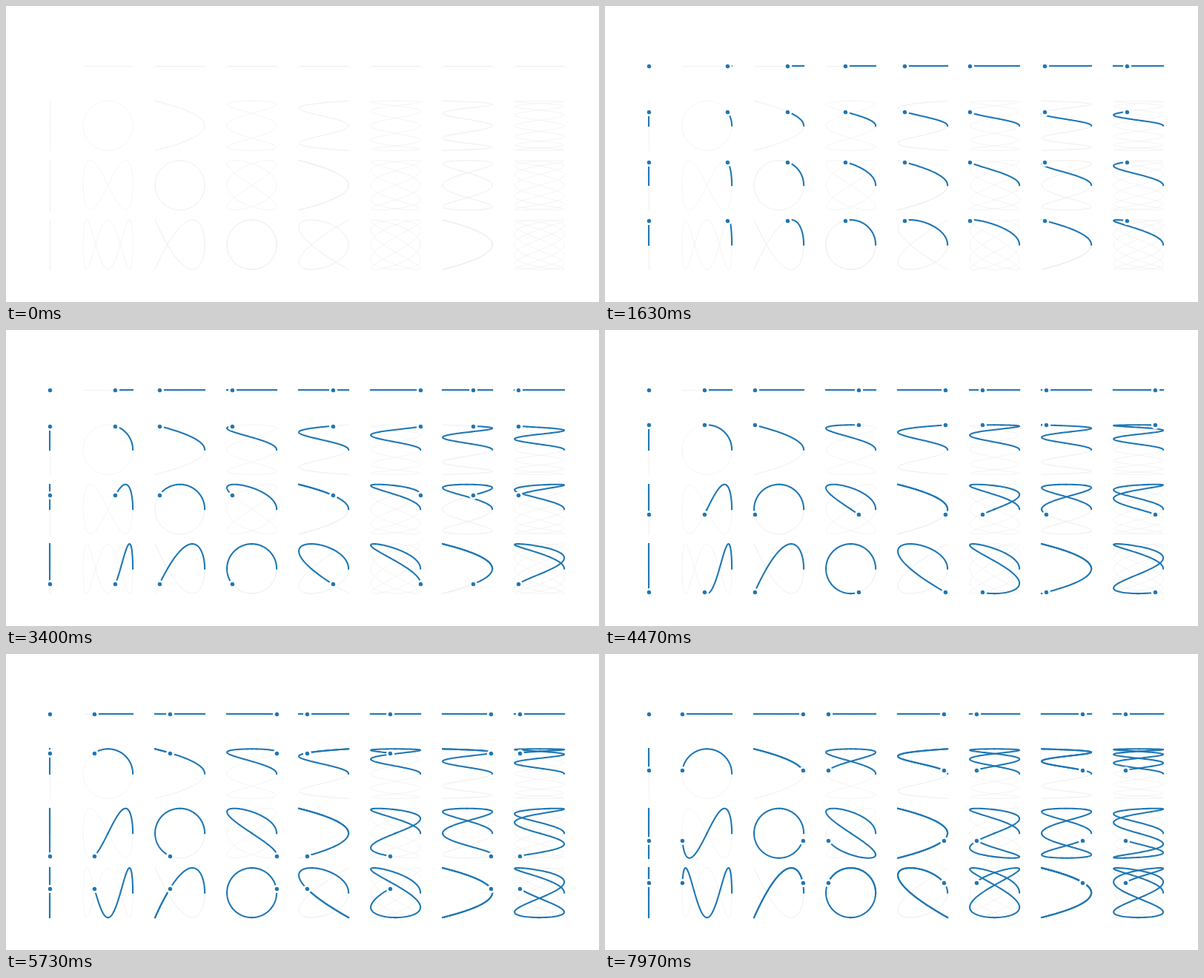
Write an HTML page with a canvas that moves like this. It is 800 by 400 pixels and loops after 8000 ms.

```html
<!DOCTYPE html>
<html>
<head>
<meta charset="utf-8">
<title>Lissajous table</title>
<style>
  html, body { margin: 0; width: 100%; height: 100%; overflow: hidden; background: #fff; }
  canvas { display: block; }
</style>
</head>
<body>
<canvas id="stage" width="800" height="400"></canvas>
<script>
const ctx = document.getElementById('stage').getContext('2d');
const LOOP = 8000, COLS = 8, ROWS = 4, RADIUS = 33.5;
const STEPS = 499, STEP_ANGLE = 2 * Math.PI / STEPS;
const BLUE = '#1f77b4', FAINT = '#eeeeee';
const LINE = 2.08, HAIR = 0.69, DOT = 4.17, RIM = 2.78;

const gcd = (a, b) => b ? gcd(b, a % b) : a;

// Column gives the x frequency, row the y frequency; 0 means no motion on that axis.
function pointAt(col, row, step) {
  const angle = step * STEP_ANGLE;
  return [
    col ? 40.6 + 97 * col + RADIUS * Math.cos(col * angle) : 59,
    81.4 + 80.4 * row - RADIUS * Math.sin(row * angle)
  ];
}

// Strokes pieces separately so that retraced parts get stronger edges.
function drawCurve(col, row, last, color, width) {
  const straight = !col || !row;
  const offset = width === HAIR ? 0.5 : 0;
  const snap = v => straight ? Math.round(v) + offset : v;
  const piece = STEPS / (4 * gcd(col, row));
  ctx.strokeStyle = color;
  ctx.lineWidth = width;
  for (let n = 0; Math.round(n * piece) < last; n++) {
    const end = Math.min(last, Math.round((n + 1) * piece));
    ctx.beginPath();
    for (let step = Math.round(n * piece); step <= end; step++) {
      const [x, y] = pointAt(col, row, step);
      ctx.lineTo(snap(x), snap(y));
    }
    ctx.stroke();
  }
}

function drawDot(col, row, step) {
  const [x, y] = pointAt(col, row, step);
  ctx.beginPath();
  ctx.arc(Math.round(x) + 0.5, Math.round(y) + 0.5, DOT, 0, 2 * Math.PI);
  ctx.fillStyle = BLUE;
  ctx.fill();
  ctx.strokeStyle = '#fff';
  ctx.lineWidth = RIM;
  ctx.stroke();
}

function draw(tick) {
  const step = tick - 1;
  ctx.fillStyle = '#fff';
  ctx.fillRect(0, 0, 800, 400);
  ctx.lineCap = 'square';
  ctx.lineJoin = 'round';
  for (let row = 0; row < ROWS; row++) {
    for (let col = 0; col < COLS; col++) {
      if (col || row) {
        drawCurve(col, row, STEPS, FAINT, HAIR);
        drawCurve(col, row, step, BLUE, LINE);
      }
      if (step >= 0) drawDot(col, row, step);
    }
  }
}

// 30 ticks per second, with tick times rounded to 10 ms.
const tickAt = ms => Math.floor((3 * Math.floor(ms / 10) + 1) / 10);

const start = performance.now();
let shown = -1;
function play() {
  const tick = tickAt((performance.now() - start) % LOOP);
  if (tick !== shown) draw(shown = tick);
  requestAnimationFrame(play);
}
play();
</script>
</body>
</html>
```
